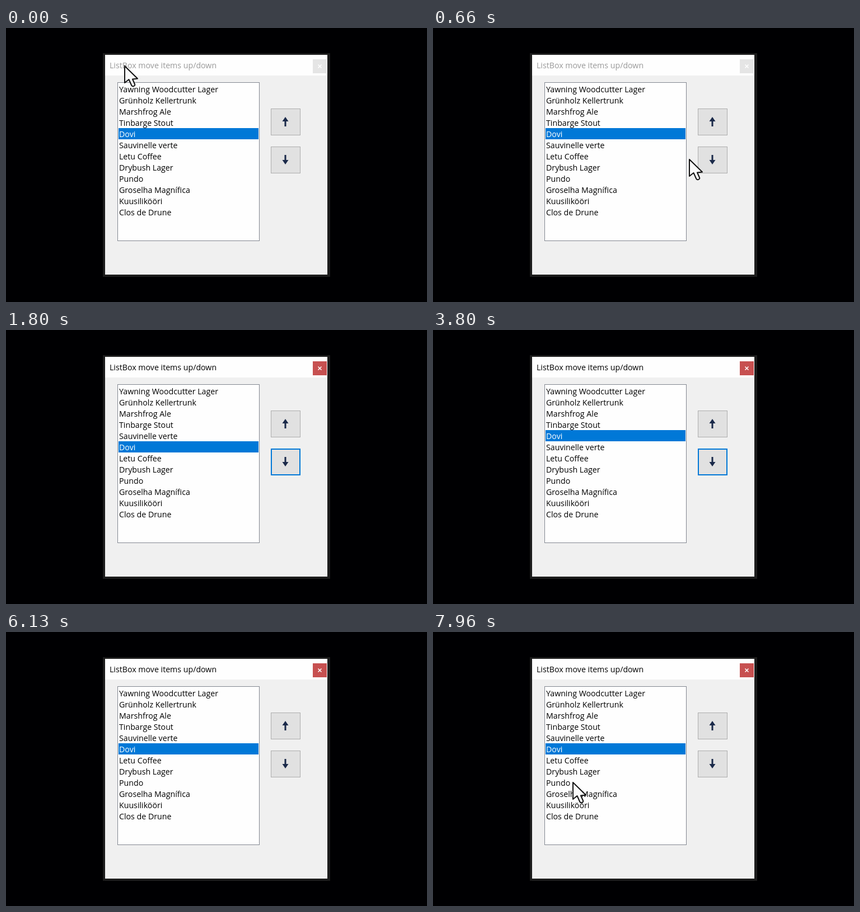
An HTML page for the animation above (8000 ms loop, 752 by 490 pixels).

```html
<!DOCTYPE html>
<html lang="en">
<head>
<meta charset="utf-8">
<title>ListBox move items up/down</title>
<style>
  html, body { margin: 0; width: 100%; height: 100%; overflow: hidden; background: #000002; }
  svg { display: block; }
  text { font: 14.2px "Open Sans", "Noto Sans", sans-serif; white-space: pre; }
  rect { shape-rendering: crispEdges; }
</style>
</head>
<body>
<svg width="752" height="490" viewBox="0 0 752 490">
  <clipPath id="capture"><rect x="173" y="45" width="406" height="400"/></clipPath>
  <rect x="173" y="45" width="406" height="400" fill="#1c1c1c"/>
  <rect x="177" y="48" width="397" height="393" fill="#f0f0f0"/>
  <rect x="177" y="48" width="397" height="37" fill="#fefefe"/>
  <text id="title" x="185" y="72">ListBox move items up/down</text>
  <rect id="close" x="548" y="56" width="25" height="25"/>
  <path d="M557.5 65.5l6 6m0-6l-6 6" stroke="#fff" stroke-width="1.5"/>

  <rect x="199.5" y="97.5" width="253" height="283" fill="#fefefe" stroke="#828790"/>
  <rect id="selection" x="201" width="250" height="20" fill="#0078d7"/>
  <g id="rows"></g>

  <rect id="up"/>
  <path d="M499 159l5.5 8h-4v9h-3v-9h-4z" fill="#1b2a4a"/>
  <rect id="down"/>
  <path d="M499 244l5.5-8h-4v-9h-3v9h-4z" fill="#1b2a4a"/>

  <g clip-path="url(#capture)">
    <path id="cursor" d="M1 2V32L8.5 26 13.2 36.5Q14.5 39 17 38 20 37 19 34.5L15 25.5 24 24.5Z"
          fill="#fafafa" stroke="#111" stroke-width="2" stroke-linejoin="round"/>
  </g>
</svg>
<script>
const LOOP = 8000;
const MOVING = 'Dovi';
const OTHERS = [
  'Yawning Woodcutter Lager', 'Grünholz Kellertrunk', 'Marshfrog Ale', 'Tinbarge Stout',
  'Sauvinelle verte', 'Letu Coffee', 'Drybush Lager', 'Pundo',
  'Groselha Magnífica', 'Kuusilikööri', 'Clos de Drune'
];
// [first tick, row of the selected item]
const MOVES = [[0, 4], [39, 5], [114, 4], [124, 3], [150, 4], [159, 5]];
const PRESS = 36, RELEASE = 39;

const el = id => document.getElementById(id);
const set = (node, attrs) => {
  for (const key in attrs) node.setAttribute(key, attrs[key]);
};
const lerp = (a, b, p) => a + (b - a) * p;
const clamp = p => Math.min(1, Math.max(0, p));
const smooth = p => p * p * (3 - 2 * p);

const rows = [MOVING, ...OTHERS].map(name => {
  const row = document.createElementNS('http://www.w3.org/2000/svg', 'text');
  row.textContent = name;
  set(row, { x: 202, fill: name === MOVING ? '#fff' : '#000' });
  return el('rows').appendChild(row);
});

const tickAt = ms => Math.floor((Math.floor(ms / 10) * 10 + 9) * 0.03);

function cursorAt(tick) {
  if (tick < 49) {
    const p = smooth(clamp(tick / 25));
    const slide = clamp((tick - 25) / 3);
    return [lerp(211, 485, p) + 21 * slide, lerp(66, 240, 1 - (1 - p) ** 1.4)];
  }
  if (tick < 54) {
    const p = (tick - 48) / 5;
    return [lerp(506, 208, p), lerp(240, 249, p)];
  }
  if (tick >= 226) {
    const p = 1 - (1 - clamp((tick - 225) / 14)) ** 2;
    return [lerp(150, 249, p), lerp(236, 267, p)];
  }
  return null;
}

function drawButton(id, y, { focus, hover, pressed }) {
  const line = focus && !pressed ? 2 : 1;
  set(el(id), {
    x: 473 + line / 2, y: y + line / 2, width: 53 - line, height: 48 - line,
    fill: pressed ? '#cce4f7' : hover ? '#e5f1fb' : '#e1e1e1',
    stroke: pressed ? '#005499' : hover || focus ? '#0078d7' : '#adadad',
    'stroke-width': line
  });
}

function draw(tick) {
  const active = tick >= PRESS;
  set(el('title'), { fill: active ? '#000' : '#999' });
  set(el('close'), { fill: active ? '#c75050' : '#e5e5e5' });

  const selected = MOVES.findLast(([start]) => tick >= start)[1];
  set(el('selection'), { y: 99 + 20 * selected });
  rows.forEach((row, i) => {
    const place = i === 0 ? selected : i - 1 + (i > selected);
    set(row, { y: 115 + 20 * place });
  });

  const pos = cursorAt(tick);
  set(el('cursor'), pos
    ? { visibility: 'visible', transform: `translate(${pos.map(Math.round)})` }
    : { visibility: 'hidden' });

  const hover = pos && pos[0] >= 473 && pos[1] >= 212;
  drawButton('up', 144, { focus: tick >= 175 && tick < 184 });
  drawButton('down', 212, {
    hover,
    focus: active && tick < 175,
    pressed: active && tick < RELEASE
  });
}

const begin = performance.now();
function loop() {
  draw(tickAt((performance.now() - begin) % LOOP));
  requestAnimationFrame(loop);
}
loop();
</script>
</body>
</html>
```
